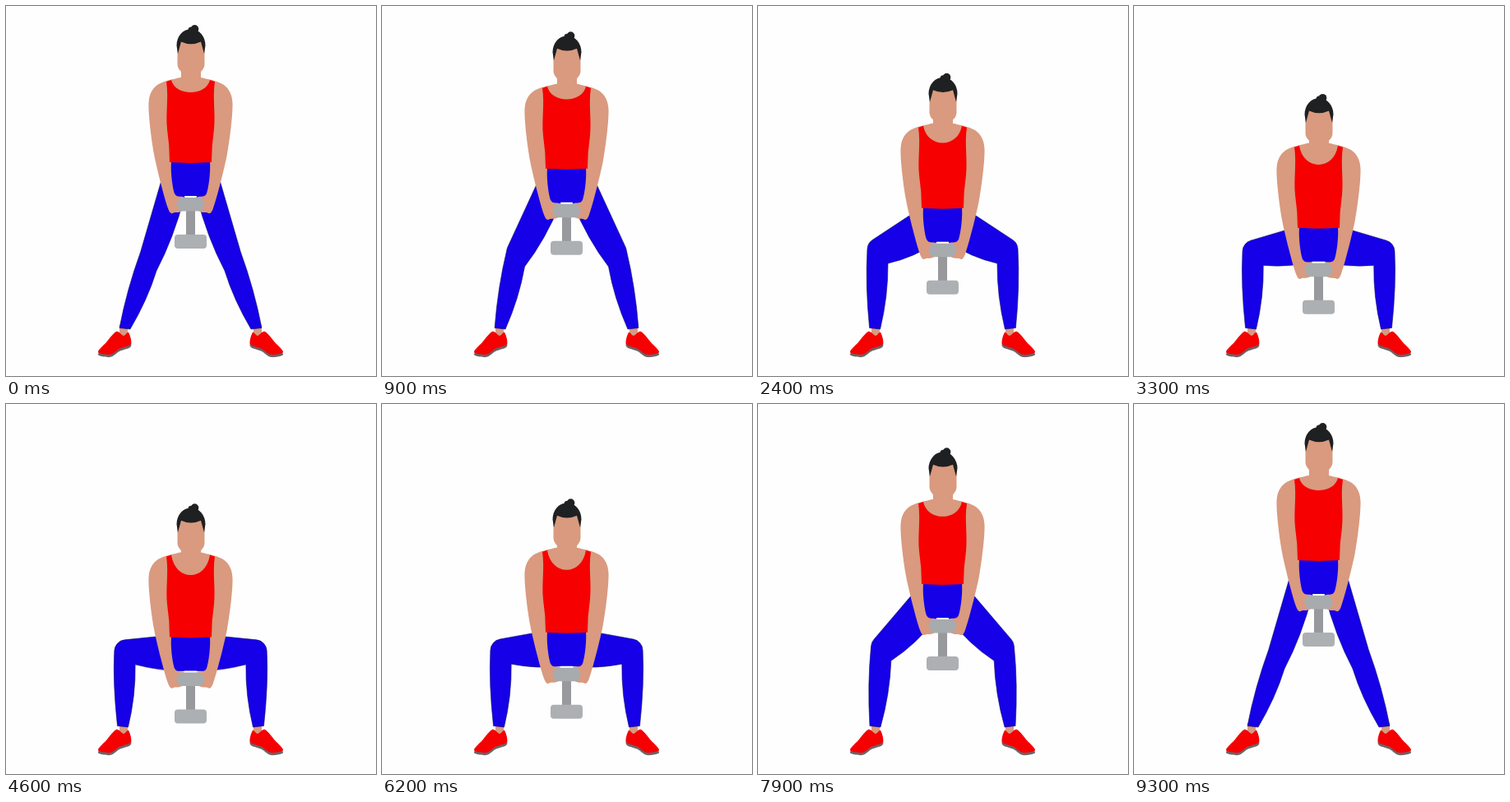
Recreate the animation shown at these times as an HTML page with a canvas. Size 450x450 px, loop 9.4 s.

```html
<!DOCTYPE html>
<html lang="en">
<head>
<meta charset="utf-8">
<title>Dumbbell squat</title>
<style>
  html, body { margin: 0; width: 100%; height: 100%; overflow: hidden; background: #fefefe; }
  canvas { display: block; }
</style>
</head>
<body>
<canvas id="stage" width="450" height="450"></canvas>
<script>
const ctx = document.getElementById('stage').getContext('2d');
const LOOP = 9400, STEP = 100, MIRROR = 449, DEPTH = 99.5;
const SKIN = '#d99a7f', BLUE = '#1500e8', RED = '#f60002', HAIR = '#1f2022';

// Left halves, as x, y pairs joined smoothly
const ARM = [226,86, 212,87, 184,96, 173.5,118, 180,180, 197,246, 206,251, 216,248,
  217,233, 205,228, 201,190, 212,140, 226,122];
const SHOE = [112,421, 122,409, 134,396, 143,401, 149,397, 152,411, 138,417, 127,424];

// Slow start, then a sine slows the cosine ease towards its end
const ease = (ms, rate) =>
  (1 - Math.cos(Math.PI * Math.sin(Math.min(Math.max(ms, 0) * rate, Math.PI / 2)))) / 2;

// The squat sinks more slowly than it rises
const dropAt = t => DEPTH * Math.min(ease(t - 210, 0.00027), ease(9000 - t, 0.000347));

function paint(color, line) {
  ctx.fillStyle = color;
  ctx.fill();
  if (line) {
    ctx.strokeStyle = line;
    ctx.lineWidth = 0.6;
    ctx.stroke();
  }
}

// Closed smooth outline through points
function blob(p, color) {
  const n = p.length / 2;
  const x = i => p[(i + n) % n * 2], y = i => p[(i + n) % n * 2 + 1];
  ctx.beginPath();
  ctx.moveTo(x(0), y(0));
  for (let i = 0; i < n; i++) {
    ctx.bezierCurveTo(
      x(i) + (x(i + 1) - x(i - 1)) / 7, y(i) + (y(i + 1) - y(i - 1)) / 7,
      x(i + 1) - (x(i + 2) - x(i)) / 7, y(i + 1) - (y(i + 2) - y(i)) / 7,
      x(i + 1), y(i + 1));
  }
  paint(color);
}

function box(x, y, w, h, r, color) {
  ctx.beginPath();
  ctx.roundRect(x, y, w, h, r);
  paint(color);
}

function oval(x, y, rx, ry, color) {
  ctx.beginPath();
  ctx.ellipse(x, y, rx, ry, 0, 0, 7);
  paint(color);
}

function shifted(dy, draw) {
  ctx.save();
  ctx.translate(0, dy);
  draw();
  ctx.restore();
}

function bothSides(draw) {
  draw();
  ctx.save();
  ctx.transform(-1, 0, 0, 1, MIRROR, 0);
  draw();
  ctx.restore();
}

// Line from a to b, its middle pulled aside by dx, dy
function bow([ax, ay], [bx, by], dx, dy) {
  ctx.quadraticCurveTo((ax + bx) / 2 + dx, (ay + by) / 2 + dy, bx, by);
}

function leg(drop) {
  const straight = Math.exp(-drop / 18);
  const hip = [185 + 4 * straight, 212 + 0.72 * drop];
  const knee = [132 + 32 * straight, 288 + 10 * straight];
  const ankle = [135.5 + 2.5 * straight, 391.5];
  const heel = [148.5 + 2.5 * straight, 393];
  const kneeBack = [157 + 26 * straight, 306 + 0.11 * drop + 16 * straight];
  const crotch = [217, 232 + 0.94 * drop];
  ctx.beginPath();
  ctx.moveTo(204, 200 + 0.83 * drop);
  ctx.lineTo(...hip);
  ctx.arcTo(...knee, knee[0] + (ankle[0] - knee[0]) / 3 - 2, knee[1] + 34, 14);
  bow(knee, ankle, -4, 0);
  ctx.lineTo(...heel);
  bow(heel, kneeBack, 5, 0);
  bow(kneeBack, crotch, 4, 5);
  ctx.closePath();
  paint(BLUE, '#0c0a60');
}

function foot() {
  box(138, 388, 10, 16, 0, SKIN);
  shifted(3, () => blob(SHOE, '#6b6468'));
  blob(SHOE, RED);
}

function shirt(lean) {
  const dip = 110 + 13 * lean;
  ctx.beginPath();
  ctx.moveTo(224.5, 191);
  ctx.lineTo(199, 190);
  ctx.quadraticCurveTo(199, 170, 196, 150);
  ctx.bezierCurveTo(194, 130, 198, 112, 195, 92);
  ctx.lineTo(201, 90);
  ctx.bezierCurveTo(206, dip, 243, dip, 248, 90);
  ctx.lineTo(254, 92);
  ctx.bezierCurveTo(251, 112, 255, 130, 253, 150);
  ctx.quadraticCurveTo(250, 170, 250, 190);
  paint(RED);
}

function dumbbell() {
  box(219, 246, 11, 36, 0, '#97999c');
  box(205, 278, 39, 17, 4, '#adb0b3');
  box(207.5, 233, 34, 16.5, 8, '#a7abae');
}

function head() {
  box(213, 70, 24, 22, 3, SKIN);
  box(208.5, 40, 33, 43, [10, 10, 13, 13], SKIN);
  ctx.beginPath();
  ctx.moveTo(209, 58);
  ctx.lineTo(207.5, 48);
  ctx.ellipse(225, 48, 17.5, 20, 0, Math.PI, 2 * Math.PI);
  ctx.lineTo(241, 58);
  ctx.lineTo(237, 43.5);
  ctx.quadraticCurveTo(225, 49, 213, 43.5);
  paint(HAIR);
  oval(229.5, 28, 4.8, 5, HAIR);
  oval(225, 29.5, 3.5, 4, HAIR);
}

function draw(t) {
  const drop = dropAt(t);
  ctx.fillStyle = '#fefefe';
  ctx.fillRect(0, 0, 450, 450);
  bothSides(() => {
    foot();
    leg(drop);
  });
  shifted(drop * 0.952, () => {
    box(200, 184, 49, 47, [0, 0, 8, 8], BLUE);
    bothSides(() => blob(ARM, SKIN));
    shirt(drop / DEPTH);
    dumbbell();
  });
  shifted(drop, head);
}

function tick() {
  const t = performance.now() % LOOP;
  draw(Math.floor(t / STEP) * STEP);
  requestAnimationFrame(tick);
}
tick();
</script>
</body>
</html>
```
